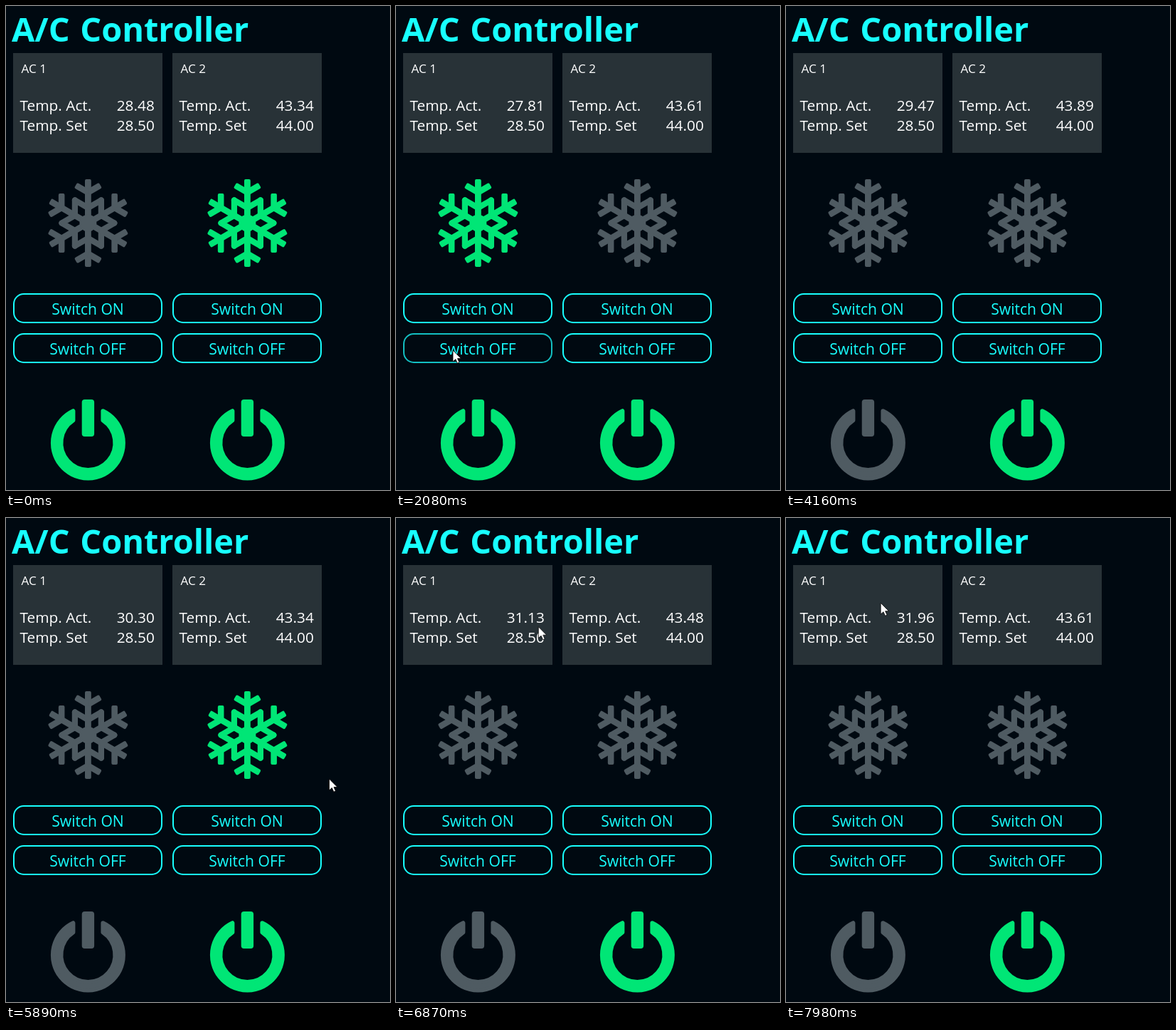
These frames come from a looping animation (540x679 px, 8 s). An HTML page:

```html
<!DOCTYPE html>
<html lang="en">
<head>
<meta charset="utf-8">
<title>A/C Controller</title>
<style>
  html, body { margin: 0; width: 100%; height: 100%; overflow: hidden; background: #000911; }
  svg { display: block; width: 540px; height: 679px; font-family: "Open Sans", "Noto Sans", sans-serif; }
  .title { font-size: 46.9px; font-weight: 700; word-spacing: 2.5px; fill: #18ffff; }
  .card { fill: #283237; }
  .name { font-size: 17.1px; fill: #fff; }
  .row { font-size: 20.8px; fill: #fff; }
  .button rect { fill: none; stroke: #18ffff; stroke-width: 2; }
  .button.hover rect { stroke: #13bfc2; }
  .button text { font-size: 21.1px; fill: #18ffff; text-anchor: middle; }
  .icon { color: #4f5b62; fill: currentColor; }
  .icon.on { color: #00e676; }
  .star { fill: none; stroke: currentColor; stroke-width: 8.3; stroke-linecap: round; stroke-linejoin: round; }
  .ring { stroke: currentColor; stroke-width: 6; stroke-linejoin: round; }
  #cursor { fill: #fff; stroke: #000; stroke-width: .8; }
</style>
</head>
<body>
<svg viewBox="0 0 540 679">
  <defs>
    <!-- one sixth of the snowflake: spoke, two barbs, star notch -->
    <g id="arm">
      <rect x="-4.4" y="-61.5" width="8.8" height="61.5" rx="2"/>
      <rect id="barb" x="-4.3" y="-20" width="8.6" height="20" rx="2" transform="translate(0 -43) rotate(60)"/>
      <use href="#barb" transform="scale(-1 1)"/>
      <path class="star" d="M-18.5 -32L0 -21.4L18.5 -32"/>
    </g>
    <g id="flake"></g>
    <g id="power">
      <path class="ring" d="M21 -44.8A49.5 49.5 0 1 1 -21 -44.8V-31.7A38 38 0 1 0 21 -31.7Z"/>
      <rect x="-8.7" y="-61" width="17.4" height="52" rx="4"/>
    </g>
  </defs>
  <text class="title" x="8" y="50">A/C Controller</text>
  <g id="units"></g>
  <path id="cursor" d="M0 0V16L3.8 12.6L6.4 18.2L9 17L6.5 11.6H11.5Z"/>
</svg>
<script>
  const LOOP = 8000, STEP = 70;
  const $ = id => document.getElementById(id);

  // rate: degrees per reading; first, period: when readings arrive; off: when power is cut
  const units = [
    { x: 0, set: 28.5, start: 28.476, rate: 0.166, first: 1050, period: 1025, cool: false, off: 2290 },
    { x: 224, set: 44, start: 43.34, rate: 0.1367, first: 390, period: 1015, cool: true, off: LOOP }
  ];

  // Thermostat: cools above the set point, warms slowly otherwise, warms fast without power.
  function reading(u, t) {
    let { start: temp, cool } = u;
    for (let at = u.first; at <= t; at += u.period) {
      const powered = at < u.off;
      cool = powered && temp > u.set;
      temp += u.rate * (cool ? -5 : powered ? 1 : 5);
    }
    return { temp, cool };
  }

  const button = (y, label) => `<g class="button">
    <rect x="11" y="${y}" width="208" height="40" rx="14"/>
    <text x="115" y="${y + 29}">${label}</text></g>`;

  const panel = (u, i) => `<g transform="translate(${u.x} 0)">
    <rect class="card" x="10" y="66" width="210" height="140"/>
    <text class="name" x="21.5" y="94">AC ${i + 1}</text>
    <text class="row" x="19.5" y="147">Temp. Act.</text>
    <text class="row" x="155.7" y="147" id="temp${i}"></text>
    <text class="row" x="19.5" y="175">Temp. Set</text>
    <text class="row" x="155.7" y="175">${u.set.toFixed(2)}</text>
    <g class="icon" id="cool${i}"><use href="#flake" x="115.4" y="304.5"/></g>
    ${button(404, "Switch ON")}${button(460, "Switch OFF")}
    <g class="icon" id="power${i}"><use href="#power" x="115.4" y="613"/></g>
  </g>`;

  for (let a = 0; a < 360; a += 60)
    $("flake").innerHTML += `<use href="#arm" transform="rotate(${a})"/>`;
  $("flake").innerHTML += `<circle r="12"/>`;
  $("units").innerHTML = units.map(panel).join("");

  const buttons = [...document.querySelectorAll(".button")].map((el, i) => ({
    el, x: units[i >> 1].x + 10, y: i % 2 ? 459 : 403
  }));

  function glide(t, start, length, [x0, y0], [x1, y1]) {
    const u = Math.min(1, (t - start) / length), e = 1 - (1 - u) ** 2;
    return [x0 + (x1 - x0) * e, y0 + (y1 - y0) * e];
  }

  // circling over the first card's readings
  function orbit(t) {
    const a = 0.28 - (t - 6870) * 0.00872;
    return [164.7 + 37 * Math.cos(a), 141 + 42 * Math.sin(a)];
  }

  function pointer(time) {
    const t = Math.floor((time - 10) / STEP) * STEP + 10;
    const press = [80, 483], left = [97, 138];
    if (t < 1130) return null;
    if (t < 2200) return glide(t, 1130, 420, [496, 609], press);
    if (t < 2560) return glide(t, 2200, 360, press, [300, 640]);
    if (t < 5890) return null;
    if (t < 6430) return glide(t, 5890, 540, [454.5, 366], left);
    if (t < 6570) return glide(t, 6430, 140, left, orbit(6570));
    return orbit(t);
  }

  function draw(t) {
    units.forEach((u, i) => {
      const { temp, cool } = reading(u, t);
      $("temp" + i).textContent = temp.toFixed(2);
      $("cool" + i).classList.toggle("on", cool);
      $("power" + i).classList.toggle("on", t < u.off);
    });
    const p = pointer(t);
    $("cursor").style.display = p ? "" : "none";
    if (p) $("cursor").setAttribute("transform", `translate(${p[0]} ${p[1]})`);
    for (const b of buttons) {
      const over = p && p[0] >= b.x && p[0] < b.x + 210 && p[1] >= b.y && p[1] < b.y + 42;
      b.el.classList.toggle("hover", !!over);
    }
  }

  let begin;
  function tick(now) {
    begin ??= now;
    draw((now - begin) % LOOP);
    requestAnimationFrame(tick);
  }
  draw(0);
  requestAnimationFrame(tick);
</script>
</body>
</html>
```
